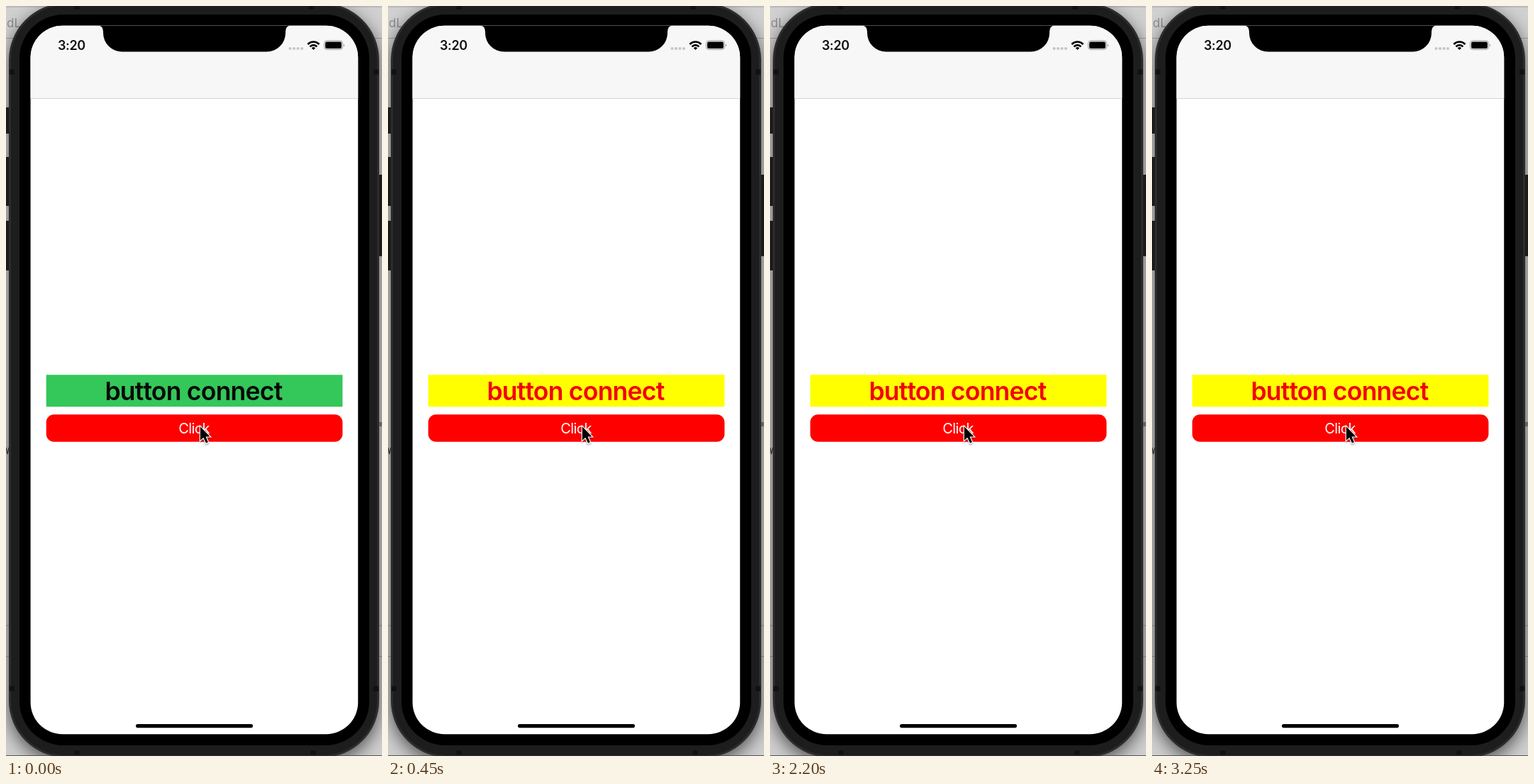
Animation of 530x1058 px, one loop 3.7 s. Source, as an HTML page:

```html
<!DOCTYPE html>
<html lang="en">
<head>
<meta charset="utf-8">
<title>Button connect</title>
<style>
  html, body { margin: 0; width: 100%; height: 100%; overflow: hidden; background: #c4c4c4; }
  svg { display: block; width: 100%; height: 100%; }
  text { font-family: Inter, "Liberation Sans", sans-serif; }
  .time { font-size: 18px; font-weight: 600; fill: #111; letter-spacing: -.35px; }
  .label { font-size: 35.5px; font-weight: 600; letter-spacing: -.75px; text-anchor: middle; }
  .click { font-size: 20px; fill: #fff; letter-spacing: -.6px; text-anchor: middle; }
  .behind { font-size: 17px; fill: #8d8d8d; }
</style>
</head>
<body>
<svg viewBox="0 0 530 1058" preserveAspectRatio="none">
  <defs>
    <filter id="soft" x="-10%" y="-10%" width="120%" height="120%"><feGaussianBlur stdDeviation="12"/></filter>
    <filter id="drop" x="-50%" y="-50%" width="200%" height="200%">
      <feDropShadow dx="0" dy="1.5" stdDeviation="1.3" flood-opacity=".4"/>
    </filter>
    <clipPath id="screen"><rect x="34.600" y="27.700" width="461.600" height="999.500" rx="45"/></clipPath>
  </defs>

  <!-- Desktop behind the phone -->
  <rect width="530" height="1058" fill="#d0d0d0"/>
  <path d="M0 1H530M0 45.5H530M0 874H530M0 917.5H530" stroke="#a2a2a2"/>
  <text class="behind" x="1" y="30">dL</text>
  <rect x="4" y="4" width="522" height="1064" rx="80" fill="#000" opacity=".6" filter="url(#soft)"/>
  <path d="M0 623l2 9 2-9M526 587v6M528.500 587v6" fill="none" stroke="#333" stroke-width="1.300"/>
  <path d="M0 1057.500H530" stroke="#555"/>

  <!-- Side keys and case -->
  <g fill="#1b1b1b">
    <rect x="-4" y="143" width="10" height="37" rx="2"/>
    <rect x="-4" y="213" width="10" height="69" rx="2"/>
    <rect x="-4" y="303" width="10" height="70" rx="2"/>
    <rect x="525" y="238" width="10" height="115" rx="2"/>
  </g>
  <rect x="4" y="-4" width="522" height="1064" rx="80" fill="#2c2c2c"/>
  <rect x="7" y="-1" width="516" height="1058" rx="77" fill="#1d1d1d"/>
  <path d="M5 93h7M518 93h7M5 963h7M518 963h7M100 0v5M430 0v5M100 1050v6M433 1050v6" stroke="#111" stroke-width="7"/>
  <rect x="19" y="12" width="493" height="1031" rx="62"/>

  <!-- Screen -->
  <g clip-path="url(#screen)">
    <rect x="34" y="27" width="463" height="1001" fill="#fff"/>
    <rect x="34" y="27" width="463" height="103" fill="#f7f7f7"/>
    <path d="M34 130.500H497" stroke="#d5d5d5"/>
    <path d="M129 27Q137 28 137 36V38A26.600 26.600 0 0 0 163.600 64.600H367.400A26.600 26.600 0 0 0 394 38V36Q394 28 402 27Z"/>
  </g>
  <text class="time" x="73" y="62">3:20</text>
  <path d="M400.500 60H420" stroke="#c4c4c4" stroke-width="4" stroke-linecap="round" stroke-dasharray="0 5.500"/>
  <g fill="none" stroke="#000" stroke-width="2.600">
    <path d="M425.300 54a11.200 11.200 0 0 1 16.200 0M428.400 57.300a6.900 6.900 0 0 1 10 0"/>
    <path d="M433.400 62l-2.700-2.700a3.900 3.900 0 0 1 5.400 0Z" fill="#000" stroke="none"/>
  </g>
  <rect x="448.500" y="49" width="26" height="12.500" rx="3.700" fill="none" stroke="#9a9a9a"/>
  <rect x="450" y="50.500" width="23" height="9.500" rx="2.300"/>
  <path d="M476 53.500q2 1.800 0 4Z" fill="#888"/>

  <rect id="band" x="56.700" y="520.300" width="417.700" height="45" fill="#34c759"/>
  <text id="label" class="label" x="264.500" y="556">button connect</text>
  <rect x="56.700" y="576.300" width="417.700" height="38.500" rx="11" fill="#f00"/>
  <text class="click" x="265" y="603">Click</text>
  <path d="M273.800 593.300V612.800L278.300 608.700L281.900 616.500L284.900 615.200L281.500 607.500H287.500Z"
        stroke="#fff" stroke-width="2.200" paint-order="stroke" filter="url(#drop)"/>
  <rect x="183" y="1013" width="165" height="5.200" rx="2.600"/>
</svg>
<script>
  const LOOP = 3700, SWITCH = 250;

  // Hold one fill until the switch, then the other for the rest of the loop.
  function switchFill(id, before, after) {
    document.getElementById(id).animate([
      { fill: before, offset: 0, easing: "step-end" },
      { fill: after, offset: SWITCH / LOOP, easing: "step-end" },
      { fill: after, offset: 1 }
    ], { duration: LOOP, iterations: Infinity });
  }

  switchFill("band", "#34c759", "#ffff00");
  switchFill("label", "#080808", "#f2000c");
</script>
</body>
</html>
```
